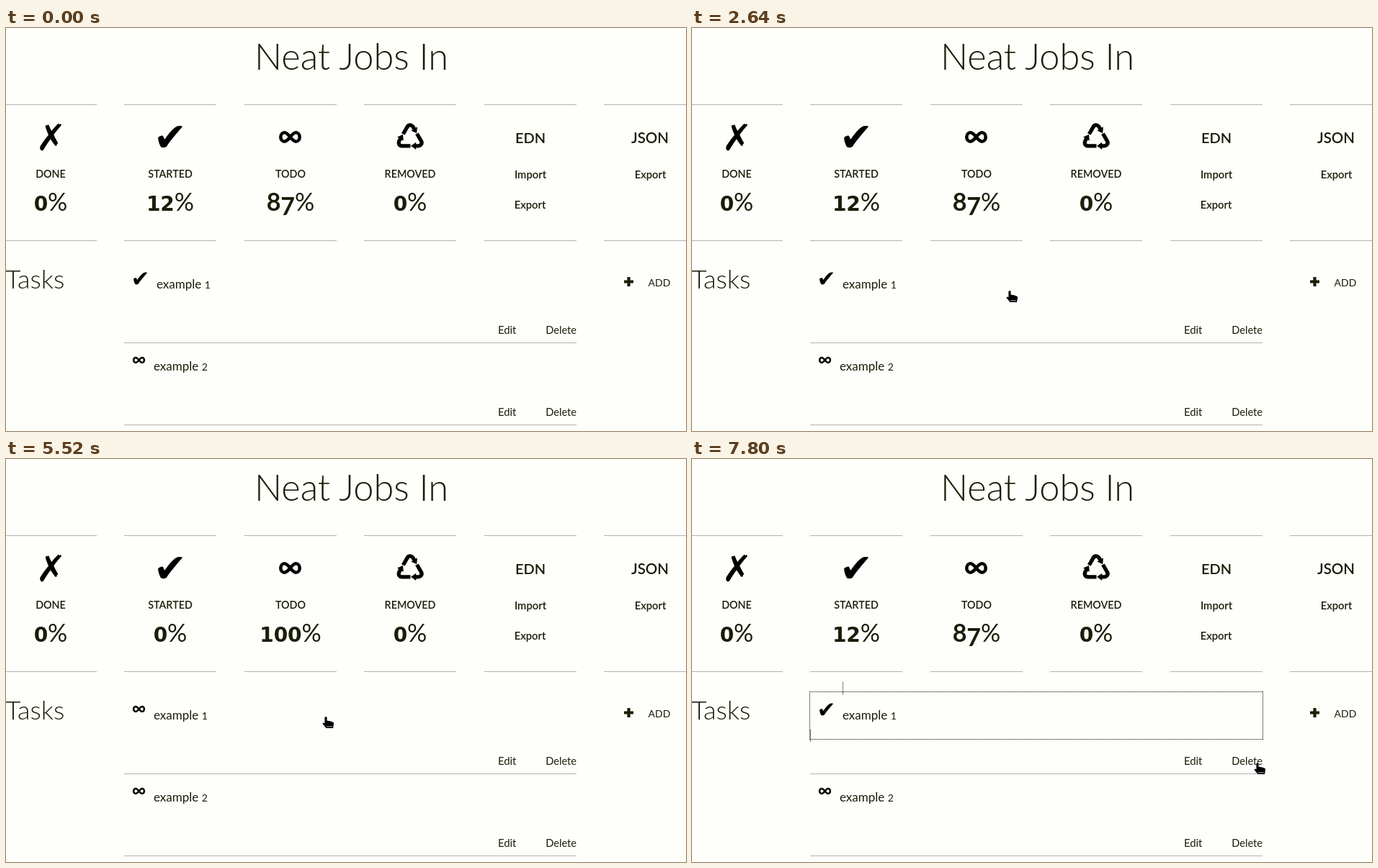
These frames come from a looping animation (944x560 px, 8000 ms). An HTML page:

```html
<!DOCTYPE html>
<html lang="en">
<head>
<meta charset="utf-8">
<title>Task list</title>
<style>
  html, body { margin: 0; width: 100%; height: 100%; overflow: hidden; background: #fefefb; }
  svg { display: block; width: 944px; height: 560px; }
  text { font-family: Lato, "Open Sans", sans-serif; fill: #1c1c08; white-space: pre; }
  .icon { font-family: "DejaVu Sans", sans-serif; fill: #000; }
  .small { font-family: "DejaVu Sans", sans-serif; font-weight: 700; font-size: 28px; }
  .rule { stroke: #b2b2b4; }
</style>
</head>
<body>
<svg id="stage" viewBox="0 0 944 560" xmlns="http://www.w3.org/2000/svg">
  <g id="page"></g>
  <g id="counts"></g>
  <g id="task"></g>
  <g id="focus" fill="none" stroke="#000" stroke-dasharray="1 1" shape-rendering="crispEdges">
    <path d="M163 323.5H793M163 389.5H793M163.5 323V390M792.5 323V390"/>
    <path d="M209.5 310v17M164.5 376v17"/>
  </g>
  <g id="cursor" fill="#000" stroke="#fff" stroke-width="1" paint-order="stroke">
    <path id="arrow" d="M0 0V15.5L3.6 12.2 6.2 18 8.7 16.9 6.2 11.3H11Z"/>
    <g id="hand">
      <path d="M-1.6 1.5a1.6 1.6 0 0 1 3.2 0V6q1-.9 2.6 .3 1.4-.7 2.6 .5 1.4-.5 2.5 .6 1.8 0 1.8 2.2L10 16H.5L-4 10.6q-1-2.2 1-2.2l1.4 1.2Z"/>
      <path d="M1 13.8H9" stroke-width=".7"/>
    </g>
  </g>
</svg>
<script>
const LOOP = 8000, STEP = 40;
const $ = id => document.getElementById(id);
const probe = document.createElement('canvas').getContext('2d');
const centers = { done: 62, started: 228, todo: 395, removed: 561 };
const marks = {
  done: { ch: '✗', height: 38, bold: 0 },
  started: { ch: '✔', height: 31, bold: 0 },
  removed: { ch: '♺', height: 35, bold: 1.6 }
};

const text = (s, x, y, size, weight = 400, anchor = 'middle') =>
  `<text x="${x}" y="${y}" font-size="${size}" font-weight="${weight}" text-anchor="${anchor}">${s}</text>`;

const rule = (x1, x2, y) => `<path class="rule" d="M${x1} ${y + 0.5}H${x2}"/>`;

// Places a symbol so that its ink is centred on (cx, cy) at the wanted height.
function symbol({ ch, height, bold }, cx, cy, scale) {
  probe.font = '100px "DejaVu Sans", sans-serif';
  const m = probe.measureText(ch);
  const up = m.actualBoundingBoxAscent, down = m.actualBoundingBoxDescent;
  const k = height * scale / (up + down);
  const x = cx - (m.actualBoundingBoxRight - m.actualBoundingBoxLeft) / 2 * k;
  const y = cy + (up - down) / 2 * k;
  return `<text class="icon" x="${x}" y="${y}" font-size="${100 * k}"
    stroke="#000" stroke-width="${bold * scale}">${ch}</text>`;
}

const infinity = (cx, cy, scale) =>
  `<path transform="translate(${cx} ${cy}) scale(${scale})" fill="none" stroke="#000" stroke-width="4.6"
    d="M0 0C4-5 6-6.2 8-6.2A5.2 6.2 0 0 1 8 6.2C6 6.2 4 5 0 0C-4-5-6-6.2-8-6.2A5.2 6.2 0 0 0-8 6.2C-6 6.2-4 5 0 0Z"/>`;

const mark = (state, cx, cy, scale) => state === 'todo'
  ? infinity(cx, cy, scale)
  : symbol(marks[state], cx, cy, scale);

// Old-style figures: 0 to 2 at x-height, 7 hanging below the baseline.
function percent(value, x) {
  const digits = [...String(value)].map(d =>
    d < '3' ? `<tspan class="small">${d}</tspan>`
    : d === '7' ? `<tspan baseline-shift="-6">${d}</tspan>` : d).join('');
  return text(`${digits}<tspan font-size="34" font-weight="400">%</tspan>`, x, 254, 34, 700);
}

function taskRow(name, number, state, y) {
  const textX = { todo: 205, removed: 211 }[state] || 209;
  const markX = state === 'todo' ? 184.5 : 186.5;
  return mark(state, markX, y - 14.5, 0.56) +
    text(`${name} <tspan font-size="14">${number}</tspan>`, textX, y, 17, 400, 'start');
}

function buildPage() {
  const parts = [text('Neat Jobs In', 479.5, 58, 50.5, 300)];
  for (let i = 0; i < 6; i++) {
    const x = Math.round(-2.4 + 166.5 * i);
    for (const y of [106, 295]) parts.push(rule(x, x + 128, y));
  }
  for (const [state, x] of Object.entries(centers)) {
    const cy = state === 'removed' ? 150.5 : 151.5;
    parts.push(mark(state, state === 'todo' ? x - 0.5 : x, cy, 1));
    parts.push(text(state.toUpperCase(), x, 208, 14.3, 600));
  }
  parts.push(
    text('EDN', 728, 160, 20, 600), text('JSON', 894, 160, 20.5, 600),
    text('Import', 728, 209, 14.8, 600), text('Export', 727.5, 251, 14.8, 600),
    text('Export', 894.5, 209, 14.8, 600),
    text('Tasks', -0.5, 362, 36, 300, 'start'),
    '<path d="M864.5 346v13M858 352.5h13" stroke="#1c1c08" stroke-width="4.2"/>',
    text('ADD', 907, 359, 14),
    taskRow('example', 2, 'todo', 476));
  for (const y of [425, 539]) {
    parts.push(text('Edit', 683, y, 14.8, 400, 'start'),
      text('Delete', 792, y, 14.6, 400, 'end'), rule(164, 792, y + 12));
  }
  $('page').innerHTML = parts.join('');
}

function stateAt(t) {
  if (t < 2960) return 'started';
  if (t < 4280) return 'done';
  if (t < 5440) return 'removed';
  return t < 7040 ? 'todo' : 'started';
}

let shown;
function showState(state) {
  if (state === shown) return;
  shown = state;
  $('counts').innerHTML = Object.entries(centers).map(([key, x]) => {
    const rest = key === 'todo' ? (state === 'todo' ? 100 : 87) : 0;
    return percent(key === state && key !== 'todo' ? 12 : rest, x);
  }).join('');
  $('task').innerHTML = taskRow('example', 1, state, 362);
}

const clamp = p => Math.max(0, Math.min(1, p));
const mix = (a, b, p) => a.map((v, i) => v + (b[i] - v) * p);
const easeOut = p => 1 - (1 - p) ** 2;
const smooth = p => p * p * (3 - 2 * p);

function cursorAt(t) {
  if (t < 2560) return mix([925, 154], [431, 367], easeOut(clamp((t - 1740) / 630)));
  if (t < 3960) return mix([431, 367], [441, 365], clamp((t - 2520) / 120));
  return mix([444, 358], [785, 422], smooth(clamp((t - 7280) / 520)));
}

const show = (id, on) => $(id).setAttribute('visibility', on ? 'visible' : 'hidden');

function render(time) {
  const t = Math.floor(time % LOOP / STEP) * STEP;
  showState(stateAt(t));
  const [x, y] = cursorAt(t);
  const visible = t >= 1440, pointing = y > 323;
  $('cursor').setAttribute('transform', `translate(${x.toFixed(1)} ${y.toFixed(1)})`);
  show('arrow', visible && !pointing);
  show('hand', visible && pointing);
  show('focus', t >= 7520);
}

buildPage();
const start = performance.now();
function tick() {
  render(performance.now() - start);
  requestAnimationFrame(tick);
}
tick();
</script>
</body>
</html>
```
